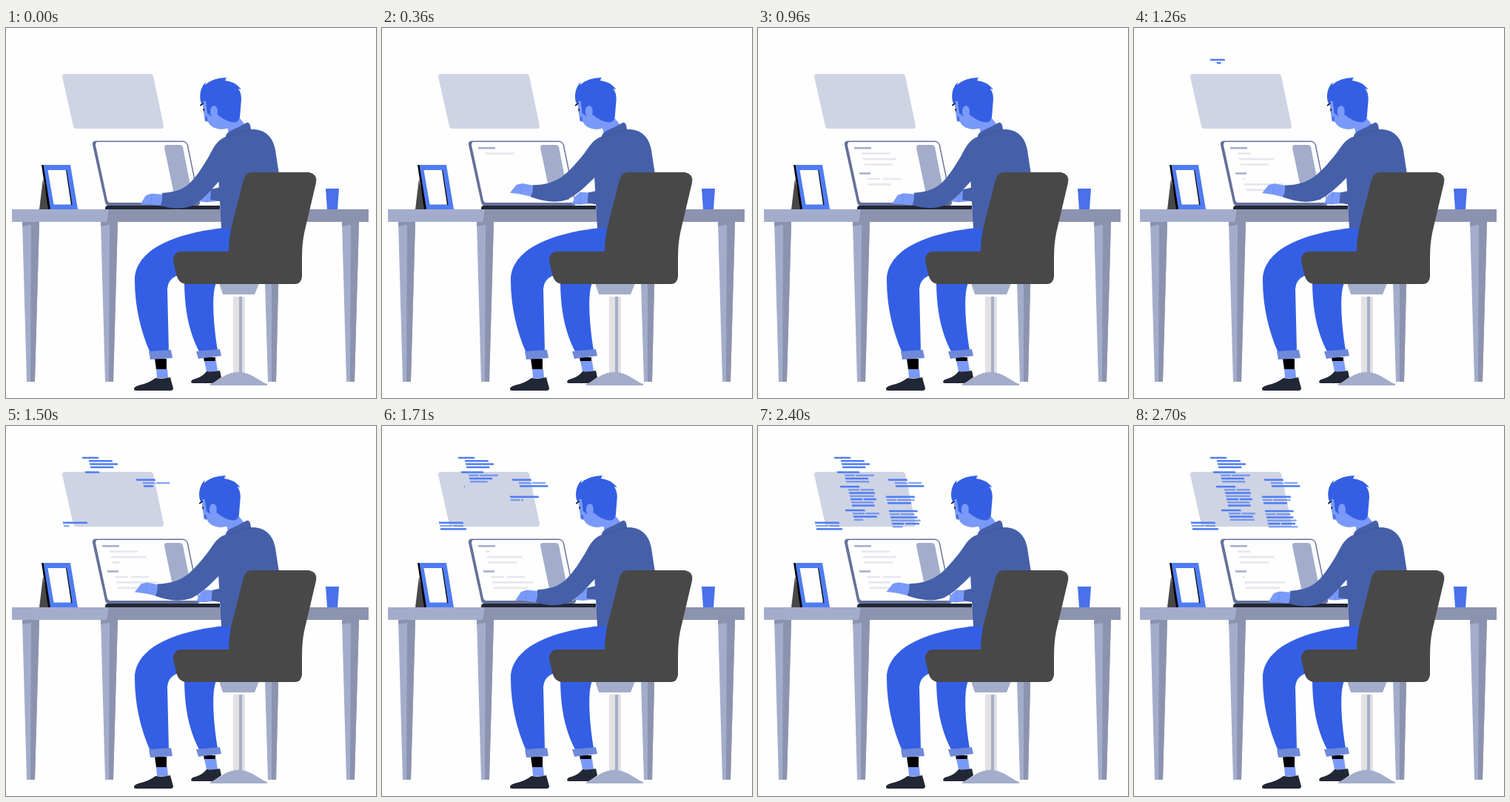
An HTML page that plays this animation: 500x500 px, repeating every 2.73 s.

```html
<!DOCTYPE html>
<html lang="en">
<head>
<meta charset="utf-8">
<title>Working at a desk</title>
<style>
html, body { margin: 0; width: 100%; height: 100%; overflow: hidden; background: #fefefe; }
svg { display: block; width: 100vw; height: 100vh; }
.steel { fill: #a3adcb; }
.shade { fill: #8b93af; }
.blue { fill: #345fe4; }
.skin { fill: #7a9af9; }
.shirt { fill: #455fa9; }
.cuff { fill: #6f89d9; }
.dark { fill: #222735; }
.chair { fill: #484848; }
.paper { fill: #fefefe; }
.crease { fill: none; stroke: #6687ec; stroke-width: .7; }
</style>
</head>
<body>
<svg viewBox="0 0 500 500">
  <path fill="#ced4e4" d="M80 62H195Q198 62 199 65L213 132Q213 136 210 136H94Q92 136 91 133L76 66Q76 62 80 62Z"/>
  <path id="bright" fill="#4f7cf5"/>
  <path id="faint" fill="#4f7cf5" opacity=".66"/>

  <g id="leg">
    <path class="steel" d="M22 262H45L39 478H28Z"/>
    <path class="shade" d="M22 262H45L39 478H33L34 266L22 268Z"/>
  </g>
  <use href="#leg" x="106"/>
  <use href="#leg" x="432"/>
  <path class="steel" d="M350 346H368L365 478H354Z"/>
  <path class="shade" d="M359 346H368L365 478H359Z"/>
  <path class="steel" d="M8 245H490V262H8Z"/>
  <path class="shade" d="M139 245H490V262H136Z"/>

  <path class="chair" d="M50 204L45 245H59Z"/>
  <path d="M48 185H52L61 245H57Z"/>
  <path fill="#4f7cf2" d="M50.500 185H87L97 245H60Z"/>
  <path d="M80 192H82L89.500 239H87Z"/>
  <path class="paper" d="M56.500 192H81L88 238.500H64.500Z"/>
  <path fill="#4a70ea" d="M432 217H450L448 245H434Z"/>

  <path fill="#65709a" d="M121 152.500H239Q244 153 246 158L262 236Q262 240 258 240H139Q135 240 134 236L117 158Q116 153 121 152.500Z"/>
  <path class="paper" d="M124 154H239Q243 154 244.500 158L260 233Q260 236 257 236H141Q138 236 137 233L121 158Q121 154 124 154Z"/>
  <path class="steel" d="M217 158H235Q238 158 239 161L253 232H231Q229 232 228 229L214 162Q214 158 217 158Z"/>
  <path id="title" class="steel"/>
  <path id="text" fill="#e6e7ee"/>
  <path class="dark" d="M137 240H289V245H134Q134 240 137 240Z"/>

  <g id="farHand">
    <path class="skin" d="M256 238L261 227L267 222L284 223V237L266 239Z"/>
    <path class="crease" d="M268 223L266 238"/>
  </g>
  <path id="farSleeve" class="shirt" d="M279 223L296 219V240L278 237Z"/>

  <path class="blue" d="M241 340C241 380 247 410 261 437L286 435C281 405 279 375 281 357Q282 350 285 340Z"/>
  <path class="blue" d="M310 269C255 272 174 290 174 341C174 376 182 410 195 439L220 437L218 352Q219 340 230 335H310Z"/>
  <path d="M201 447H217V461H203ZM267 445H283V451H268Z"/>
  <path class="skin" d="M203 461H218L219 473H204ZM268 450H284L286 464H271Z"/>
  <path class="cuff" d="M193 437L223 435L225 446L195 448ZM257 437L289 434L291 443L260 447Z"/>
  <path class="dark" d="M173 489Q172 485 179 483Q193 480 202 473Q212 475 222 472L226 487Q226 490 222 490H175ZM250 479Q250 475 256 474Q266 471 271 464Q280 465 289 463L291 472L280 480H252Z"/>

  <g id="head">
    <path class="skin" d="M299 134L316 122L324 132L302 146Z"/>
    <path class="skin" d="M265 96L267 114L269 126L273 127Q277 136 291 137Q306 136 313 126L304 92Z"/>
    <path d="M262 105Q263 102 267 101V102.500L263 105.500ZM266 110L268 109V113Z"/>
    <path fill="#4a6fe6" d="M268.500 121L271 119L273 125L269.500 126Z"/>
    <path class="blue" d="M263 99C261 90 263 80 270 73L269 77Q280 67 298 67L296 71Q309 72 318 83L314 82Q318 88 318 96L316 121Q314 127 309 127.500Q297 127 286 117L277 119L272 115L270 99Q266 98 265 104Z"/>
    <ellipse class="skin" cx="281" cy="113" rx="5" ry="8"/>
  </g>

  <path class="shirt" d="M297 148Q296 143 303 139Q315 134 325 128Q330 126 331 137C348 136 361 146 364 165L369 198L330 271H291L287 200Z"/>
  <g id="hand">
    <path class="skin" d="M172 221L181 210L189 208.500L206 212L202 227L186 223Z"/>
    <path class="crease" d="M189 210L186 222"/>
  </g>
  <path id="arm" class="shirt"/>
  <path fill="none" stroke="#3c539a" stroke-width=".8" d="M297 148Q313 140 331 137"/>

  <path fill="#e1e1e3" d="M307 363H323V470H307Z"/>
  <path class="steel" d="M315 363H319V470H315ZM288 345H342L336 360H293ZM276 483V481C288 477 296 465 314 465S341 477 353 481V483Z"/>
  <path class="chair" d="M332 195H409Q421 197 419 209L403 277Q400 292 400 310V336Q399 346 390 346H243Q234 345 231 336L226 316Q225 303 237 302H301Q301 284 305 268L321 205Q324 195 332 195Z"/>
</svg>
<script>
const LOOP = 2730, CYCLE = LOOP / 3, RETYPE = 480;
const RESTING = 'M302 146C286 148 280 163 275 172C264 191 254 206 243 214Q232 222 211 223Q212 232 209 240Q233 247 252 240C266 233 276 220 288 207L305 175Z';
const RAISED = 'M302 146C286 147 280 161 274 168C264 180 254 191 245 198Q228 211 203 211Q204 219 200 227Q230 238 250 231C266 223 276 212 288 201L305 175Z';

const el = id => document.getElementById(id);
const clamp = v => Math.max(0, Math.min(1, v));
const set = (id, name, value) => el(id).setAttribute(name, value);

function mix(a, b, p) {
  const to = b.match(/\d+/g);
  let i = 0;
  return a.replace(/\d+/g, n => (+n + (to[i++] - n) * p).toFixed(2));
}

let seed = 9;
const random = () => (seed = seed * 16807 % 2147483647) / 2147483647;

// Floating code: each lane types its blocks one row after another.
const block = (x, y, count, indent = 0) => Array.from({ length: count }, (_, i) => ({
  x: x + i + (i && indent),
  y: y + i * 4.25,
  w: (i || !indent ? 30 : 22) + random() * 10,
  gap: i % 3 === 1 && y > 50 ? 10 + random() * 8 : 0,
  faint: i % 2 === 1 && y > 50
}));
const lane = (start, step, ...blocks) =>
  blocks.flat().map((row, i) => ({ ...row, start: start + i * step }));

const code = [
  ...lane(1180, 66, block(103, 43, 4, 8), block(107, 62.5, 4, 9), block(111, 82, 7, 10), block(118, 114, 4, 9)),
  ...lane(1270, 100, block(176, 72.8, 3, 8), block(173, 95.7, 3), block(177, 115, 6)),
  ...lane(1400, 80, block(77, 130.8, 3))
];

// Laptop text: two paragraphs, each a title and three indented rows.
const lines = Array.from({ length: 8 }, (_, k) => {
  const part = k >> 2, i = k % 4;
  return {
    x: 130 + 7 * part + (i && 8 + 2 * i),
    y: 162.2 + 34.3 * part + 7.45 * i,
    w: i ? 38 + 8 * part + (i === 2 ? 9 : 0) : 23 - 8 * part,
    gap: k === 5 ? 18 : 0,
    start: 125 + 130 * k,
    isTitle: !i
  };
});

const bar = (x, y, w) => w > .3 ? `M${x - .4} ${y - 1.3}h${w}l.8 2.6h${-w}Z` : '';
const typed = ({ x, y, w, gap }, part, space) => gap
  ? bar(x, y, Math.min(w * part, gap)) + bar(x + gap + space, y, w * part - gap - space)
  : bar(x, y, w * part);

function draw(t) {
  const raised = (1 - Math.cos(2 * Math.PI * t / CYCLE)) / 2;
  const rest = 1 - raised;
  set('arm', 'd', mix(RESTING, RAISED, raised));
  set('hand', 'transform', `translate(${9 * rest} ${13.5 * rest}) rotate(${-7 * rest} 202 219)`);
  set('farHand', 'transform', `translate(${6 * rest} ${-3.5 * rest})`);
  set('farSleeve', 'transform', `translate(${-2 * rest} ${-5 * rest})`);
  set('head', 'transform', `translate(${-1.5 * raised} 0)`);

  const paths = { bright: '', faint: '', title: '', text: '' };
  for (const row of code)
    paths[row.faint ? 'faint' : 'bright'] += typed(row, clamp((t - row.start) / 90), 1.5);
  for (const line of lines) {
    const age = t - line.start;
    const part = age < 0 ? 0 : clamp(age % RETYPE / 100);
    paths[line.isTitle ? 'title' : 'text'] += typed(line, part, 4);
  }
  for (const id in paths) set(id, 'd', paths[id]);
}

const origin = performance.now();
function tick(now) {
  draw(Math.max(0, now - origin) % LOOP);
  requestAnimationFrame(tick);
}
draw(0);
requestAnimationFrame(tick);
</script>
</body>
</html>
```
